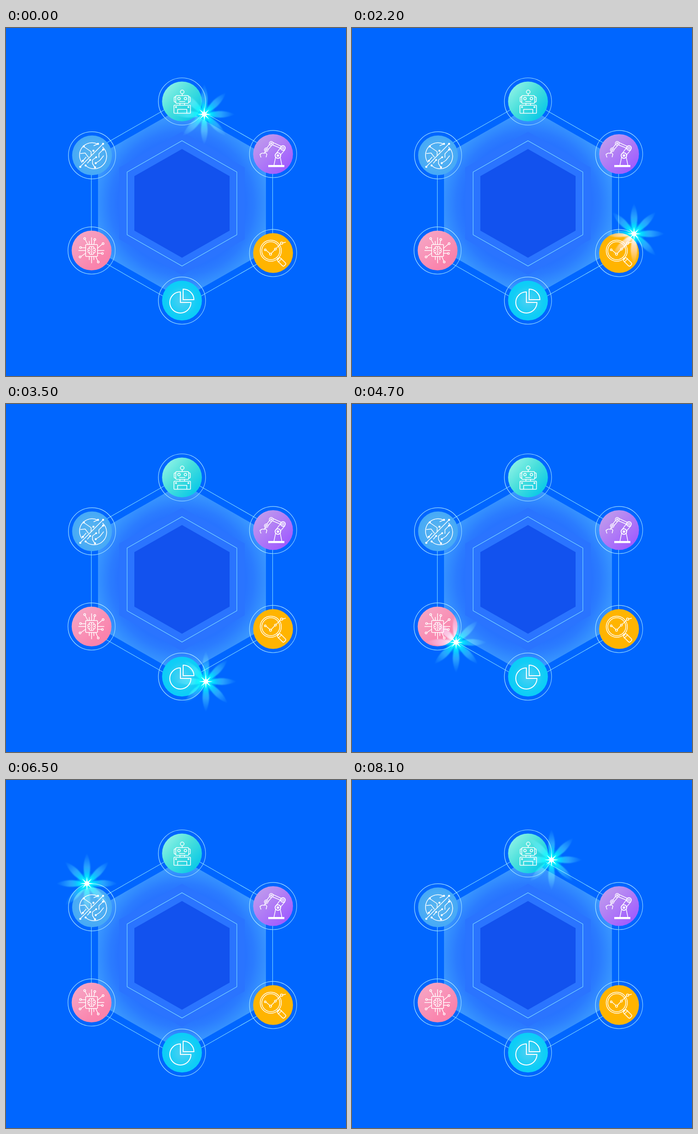
An HTML page for the animation above (8200 ms loop, 739 by 757 pixels).

```html
<!DOCTYPE html>
<html lang="en">
<head>
<meta charset="utf-8">
<title>Hexagon cycle</title>
<style>
  html, body { margin: 0; width: 100%; height: 100%; overflow: hidden; background: #0066ff; }
  svg { display: block; }
  .icon { fill: none; stroke: #fff; stroke-width: 1.5; stroke-linecap: round; stroke-linejoin: round; }
  .bold { stroke-width: 2; }
  .solid { fill: #fff; stroke: none; }
  #flare { mix-blend-mode: screen; }
</style>
</head>
<body>
<svg width="739" height="757" viewBox="0 0 739 757">
  <defs>
    <radialGradient id="halo" gradientUnits="userSpaceOnUse" cx="382.5" cy="381.5" r="211">
      <stop offset=".66" stop-color="#2874ff"/>
      <stop offset=".74" stop-color="#2b7cff"/>
      <stop offset=".82" stop-color="#318aff"/>
      <stop offset=".9" stop-color="#3a97ff"/>
      <stop offset="1" stop-color="#54a9ff"/>
    </radialGradient>
    <linearGradient id="ring" x1="0" y1="0" x2="1" y2="1">
      <stop offset="0" stop-color="#a4e6ff" stop-opacity=".8"/>
      <stop offset=".4" stop-color="#b0eaff"/>
      <stop offset="1" stop-color="#a4e6ff" stop-opacity=".7"/>
    </linearGradient>
    <linearGradient id="mint" x1=".1" y1=".1" x2=".85" y2=".8">
      <stop offset="0" stop-color="#8df2e6"/><stop offset=".5" stop-color="#48dfdc"/><stop offset="1" stop-color="#10cbe6"/>
    </linearGradient>
    <linearGradient id="violet" x1=".1" y1=".1" x2=".8" y2=".9">
      <stop offset="0" stop-color="#c09cec"/><stop offset="1" stop-color="#a05cff"/>
    </linearGradient>
    <linearGradient id="pink" x1=".1" y1=".1" x2=".7" y2=".8">
      <stop offset="0" stop-color="#f6a5c4"/><stop offset="1" stop-color="#fa83ac"/>
    </linearGradient>
    <radialGradient id="aqua">
      <stop offset="0" stop-color="#4fd0f2"/><stop offset=".75" stop-color="#12cdf6"/><stop offset="1" stop-color="#0acdf8"/>
    </radialGradient>
    <radialGradient id="sky">
      <stop offset="0" stop-color="#5ab6ee"/><stop offset="1" stop-color="#46a9f7"/>
    </radialGradient>
    <radialGradient id="ray" gradientUnits="userSpaceOnUse" cx="0" cy="0" r="67">
      <stop offset="0" stop-color="#0ff"/>
      <stop offset=".3" stop-color="#10dcff" stop-opacity=".75"/>
      <stop offset=".55" stop-color="#48b4ff" stop-opacity=".55"/>
      <stop offset="1" stop-color="#48a4ff" stop-opacity="0"/>
    </radialGradient>
    <radialGradient id="glow">
      <stop offset="0" stop-color="#0ff"/>
      <stop offset=".4" stop-color="#0ff" stop-opacity=".7"/>
      <stop offset="1" stop-color="#0cf" stop-opacity="0"/>
    </radialGradient>
    <clipPath id="stage"><rect x="82" y="68" width="600" height="614"/></clipPath>
    <filter id="soft" x="-50%" y="-50%" width="200%" height="200%"><feGaussianBlur stdDeviation="1"/></filter>
  </defs>

  <rect width="739" height="757" fill="#0066ff"/>
  <g id="hexagons"></g>
  <g id="nodes"></g>

  <!-- robot -->
  <g class="icon">
    <circle cx="383" cy="139" r="4"/>
    <path d="M383 143v4M378 164v3.5M388 164v3.5M377 160h12M369 150h-2q-1.500 0-1.500 2v7q0 2 1.500 2h2M397 150h2q1.500 0 1.500 2v7q0 2-1.500 2h-2M373 185v-8h20v8"/>
    <rect x="369" y="147" width="28" height="17" rx="2"/>
    <rect x="365" y="168" width="36" height="17.500" rx="1"/>
    <circle cx="376" cy="153.500" r="2.800"/><circle cx="390" cy="153.500" r="2.800"/>
    <circle cx="369.500" cy="172" r="1.300"/><circle cx="396.500" cy="172" r="1.300"/>
  </g>

  <!-- robot arm -->
  <g class="icon">
    <path class="solid" d="M570 298h35v4.500h-35z"/>
    <path d="M586 281l-3.500 17M596 281l3.500 17M588 272l10.500-14M596 277l10-12M580 249l18.500 8.500M579 254l19 8M573 253l-6 8M577 256l-7 8M564 268l-3 5M554 281l-2-6 4-2.500 8-1 3 3-1.500 6"/>
    <circle cx="591" cy="277.500" r="6" class="bold"/><circle cx="591" cy="277.500" r="2.700" class="solid"/>
    <circle cx="602" cy="261" r="5" class="bold"/><circle cx="602" cy="261" r="2"/>
    <circle cx="576.500" cy="251" r="4.200"/><circle cx="576.500" cy="251" r="1.500"/>
    <circle cx="565.500" cy="265" r="4"/><circle cx="565.500" cy="265" r="1.500"/>
  </g>

  <!-- magnifier -->
  <g class="icon">
    <circle cx="575.500" cy="484.500" r="23"/><circle cx="575.500" cy="484.500" r="19.500"/>
    <path d="M565.500 483.500l7.500 6.500M577 490l7-7.500M587.500 479l9.500-9M602 467.500l5.500-1.500M589.500 500.500l3 3"/>
    <rect x="-10" y="-4.500" width="20" height="9" rx="3" transform="translate(599 509) rotate(45)"/>
    <path d="M592 509l7-7"/>
    <circle cx="563.500" cy="482.500" r="1.900"/><circle cx="575" cy="492" r="2.300"/>
    <circle cx="585.500" cy="481" r="2"/><circle cx="599" cy="468" r="2.500"/>
  </g>

  <!-- pie chart -->
  <g class="icon bold">
    <path d="M379 574a23 23 0 1 0 23 23h-23zM385 568v23h23.500a23.500 23.500 0 0 0-23.500-23z"/>
  </g>

  <!-- chip -->
  <g class="icon">
    <rect x="173" y="471" width="26" height="26" rx="2"/>
    <path d="M181 471v-7M186 471v-15M191 471l1.500-9M181 497v7M186 497v14M191 497v7M178 471l-6-11M195 497l4.500 10M173 478h-9M173 484h-15M173 490l-10 7M199 479l10.500-9M199 484h14M199 490h8"/>
    <path d="M186 475.500v17M186 476c-3-2-6 0-5 3-4 0-4 4-2 5-2 2-1 5 2 5 0 4 4 4 5 3M186 476c3-2 6 0 5 3 4 0 4 4 2 5 2 2 1 5-2 5 0 4-4 4-5 3M181 479l2 2M191 479l-2 2M179 484h3M193 484h-3M181 489l2-2M191 489l-2-2"/>
    <circle cx="171" cy="458" r="2"/><circle cx="193" cy="460" r="2"/><circle cx="211" cy="469" r="2"/>
    <circle cx="209.500" cy="490.500" r="2"/><circle cx="200.500" cy="509" r="2"/><circle cx="161" cy="498" r="2"/><circle cx="162" cy="477.500" r="2"/>
  </g>

  <!-- circuit globe -->
  <g class="icon">
    <path d="M161 302l50-50M199 252.500a27 27 0 0 0-34 40M173 299a27 27 0 0 0 37-40"/>
    <path d="M169 258l16 11v8M162 273l10-1 7 9M167 289l7-8M200 252l-9 4M211 264.500l-9 9v8M196 281l-8 6v8l5 8M183 287l-6 7M195 294l9-6 8-10"/>
    <g class="solid">
      <circle cx="211" cy="252" r="2.300"/><circle cx="161.500" cy="302" r="2.300"/><circle cx="169" cy="257.500" r="2.200"/>
      <circle cx="200" cy="252" r="2.200"/><circle cx="211" cy="264.500" r="2.200"/><circle cx="167" cy="289" r="2.200"/>
      <circle cx="190" cy="267" r="2.200"/><circle cx="195" cy="294" r="2.200"/><circle cx="196" cy="281" r="2"/>
      <circle cx="173" cy="299" r="2.200"/><circle cx="193.500" cy="303" r="2.200"/><circle cx="183" cy="287" r="2"/>
    </g>
  </g>

  <g id="flare" clip-path="url(#stage)"><g id="star"></g></g>
</svg>

<script>
const byId = id => document.getElementById(id);

// Nested, slightly flattened hexagons: radius, fill, stroke
const FLATTEN = 0.99;
const hexPoints = radius => Array.from({ length: 6 }, (_, i) => {
  const a = (i * 60 - 90) * Math.PI / 180;
  return `${382.5 + radius * Math.cos(a)},${381.5 + radius * FLATTEN * Math.sin(a)}`;
}).join(' ');
byId('hexagons').innerHTML = [
  [227.5, 'none', '#7fdcff'],
  [210.7, 'url(#halo)', 'none'],
  [157.5, '#2a74ff', 'none'],
  [137.7, 'none', '#7fdcff'],
  [119.5, '#1252ee', 'none'],
].map(([radius, fill, stroke]) =>
  `<polygon points="${hexPoints(radius)}" fill="${fill}" stroke="${stroke}" stroke-width="1.1"/>`).join('');

const nodes = [
  [382.5, 159.8, 'url(#mint)'],
  [580.5, 274.2, 'url(#violet)'],
  [580.5, 489.5, '#ffb400'],
  [382.5, 593, 'url(#aqua)'],
  [186, 484, 'url(#pink)'],
  [187, 277, 'url(#sky)'],
];
byId('nodes').innerHTML = nodes.map(([x, y, fill]) =>
  `<circle cx="${x}" cy="${y}" r="51.3" fill="none" stroke="url(#ring)" stroke-width="1.2"/>
   <circle cx="${x}" cy="${y}" r="43.3" fill="${fill}"/>`).join('');

// Track: straight between nodes, then clockwise round the outside of each ring
const ORBIT = 53;
const towards = ([x, y], [tx, ty]) => {
  const k = ORBIT / Math.hypot(tx - x, ty - y);
  return `${x + (tx - x) * k} ${y + (ty - y) * k}`;
};
const track = document.createElementNS('http://www.w3.org/2000/svg', 'path');
track.setAttribute('d', 'M' + towards(nodes[0], nodes[1]) + nodes.map((node, i) => {
  const next = nodes[(i + 1) % 6], afterNext = nodes[(i + 2) % 6];
  return `L${towards(next, node)}A${ORBIT} ${ORBIT} 0 1 1 ${towards(next, afterNext)}`;
}).join(''));
const trackLength = track.getTotalLength();

// Eight-pointed star
const petals = (d, fill) => Array.from({ length: 8 }, (_, i) =>
  `<path d="${d}" fill="${fill}" transform="rotate(${i * 45})"/>`).join('');
byId('star').innerHTML =
  `<g filter="url(#soft)">${petals('M0 0C10-28 9-44 0-67C-9-44-10-28 0 0', 'url(#ray)')}</g>
   <circle r="25" fill="url(#glow)"/>
   ${petals('M-2 0L0-15L2 0z', '#fff')}<circle r="5" fill="#fff"/>`;

// Time in ms and distance along the track
const LOOP = 8200, STEP = 100;
const keys = [
  [0, 3], [1200, 291], [1400, 335], [1500, 335], [2200, 489],
  [3500, 832], [4700, 1144], [6500, 1612.5], [8100, 2009.5], [LOOP, trackLength + 3],
];
function distanceAt(time) {
  const i = keys.findIndex(key => key[0] > time);
  const [t0, d0] = keys[i - 1], [t1, d1] = keys[i];
  return d0 + (d1 - d0) * (time - t0) / (t1 - t0);
}

const star = byId('star');
function draw() {
  const time = Math.floor(performance.now() % LOOP / STEP) * STEP;
  const { x, y } = track.getPointAtLength(distanceAt(time) % trackLength);
  star.setAttribute('transform', `translate(${x} ${y})`);
  requestAnimationFrame(draw);
}
draw();
</script>
</body>
</html>
```
